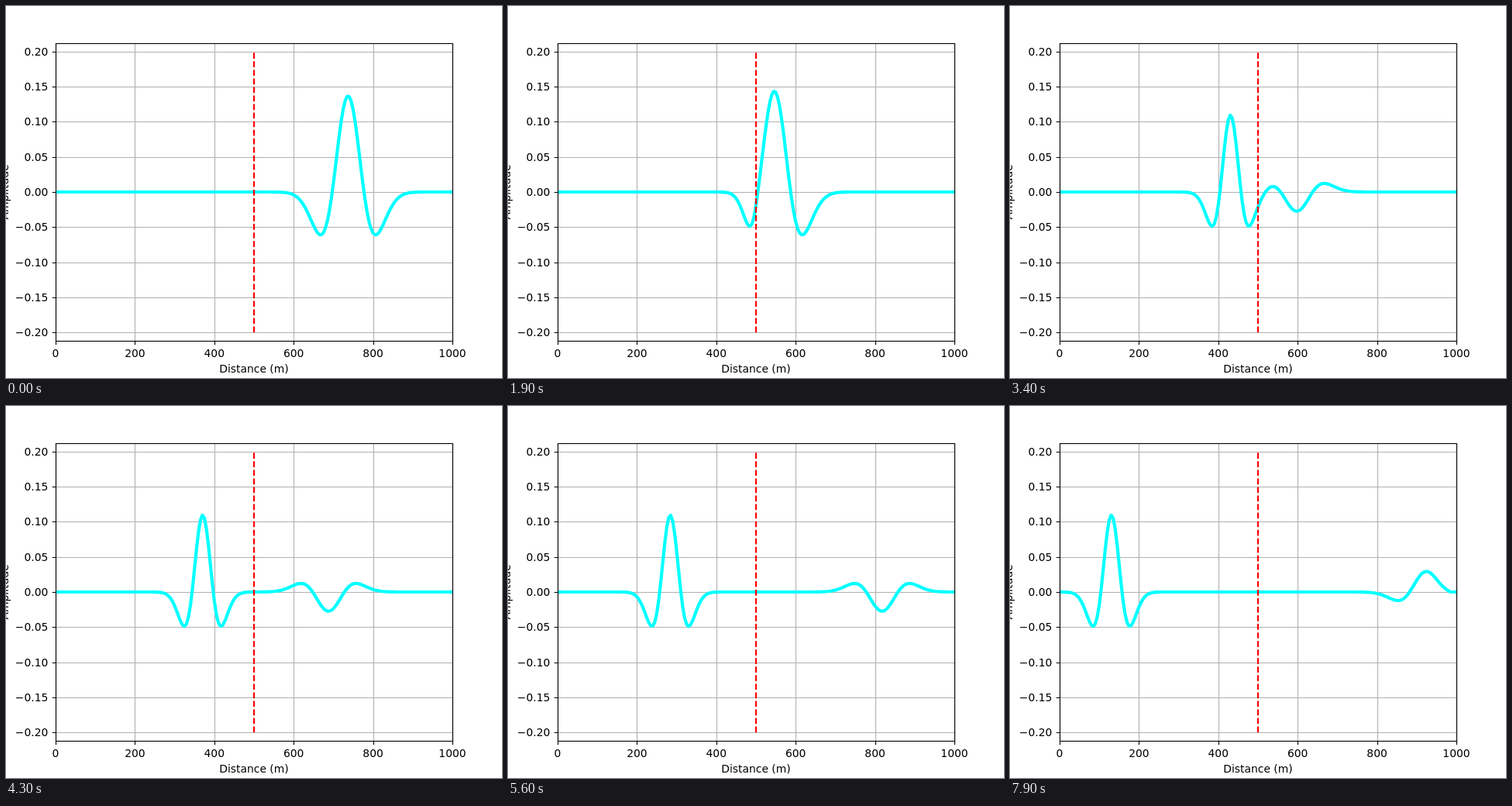
An HTML page for the animation above (8 s loop, 640 by 480 pixels).

```html
<!DOCTYPE html>
<html lang="en">
<head>
<meta charset="utf-8">
<title>Wave at an interface</title>
<style>
  html, body { margin: 0; width: 640px; height: 480px; overflow: hidden; background: #fff; }
  svg { display: block; }
  text { font: 13.89px "DejaVu Sans", sans-serif; fill: #000; }
</style>
</head>
<body>
<svg width="640" height="480" viewBox="0 0 640 480">
  <defs><clipPath id="plot"><rect x="64" y="48" width="512" height="384"/></clipPath></defs>
  <g id="grid" fill="none" stroke-width="1.11"></g>
  <g clip-path="url(#plot)" fill="none">
    <path id="wave" stroke="#0ff" stroke-width="4.17" stroke-linejoin="round" stroke-linecap="square"/>
    <path d="M320 421.3V58.7" stroke="#f00" stroke-width="2.08" stroke-dasharray="7.71 3.33"/>
  </g>
  <rect x="64.5" y="48.5" width="512" height="384" fill="none" stroke="#000" stroke-width="1.11"/>
  <g id="labels"></g>
</svg>
<script>
const FRAME_MS = 100, FRAMES = 80;
const STEP = 5;            // metres between samples
const INTERFACE = 497.5;   // where the wave speed changes
const WALL = 985;          // fixed end on the right
const FAST = 10, SLOW = FAST * 2 / 3; // metres per frame
const ARRIVAL = 23.97;     // frame at which the pulse meets the interface
const AMPLITUDE = 0.1368, WIDTH = 56.6;
const REFLECT = (SLOW - FAST) / (SLOW + FAST), TRANSMIT = 1 + REFLECT;

const toX = d => 64 + d * 0.512;
const toY = a => 240 - a * 906.6;
const snap = v => Math.floor(v + 0.5) + 0.5;
const byId = id => document.getElementById(id);

function add(parent, tag, attrs, content = "") {
  const node = document.createElementNS("http://www.w3.org/2000/svg", tag);
  for (const key in attrs) node.setAttribute(key, attrs[key]);
  node.textContent = content;
  byId(parent).append(node);
}

function label(content, x, y, anchor = "middle", extra = {}) {
  add("labels", "text", { x, y, "text-anchor": anchor, ...extra }, content);
}

function drawAxes() {
  let lines = "", ticks = "";
  for (let d = 0; d <= 1000; d += 200) {
    const x = snap(toX(d));
    lines += `M${x} 48V432`;
    ticks += `M${x} 432.5v4.86`;
    label(d, toX(d), 453);
  }
  for (let i = -4; i <= 4; i++) {
    const y = snap(toY(i * 0.05));
    lines += `M64 ${y}H576`;
    ticks += `M64.5 ${y}h-4.86`;
    label((i * 0.05).toFixed(2).replace("-", "\u2212"), 54.3, Math.round(toY(i * 0.05) + 5), "end");
  }
  add("grid", "path", { d: lines, stroke: "#b0b0b0" });
  add("grid", "path", { d: ticks, stroke: "#000" });
  label("Distance (m)", 320, 473);
  label("Amplitude", 0, 0, "middle", { transform: "translate(3 240) rotate(-90)" });
}

function ricker(offset, width) {
  const a = (offset / width) ** 2;
  return AMPLITUDE * (1 - 2 * a) * Math.exp(-a);
}

function amplitude(d, frame) {
  const since = frame - ARRIVAL;
  if (d < INTERFACE) return TRANSMIT * ricker(d - INTERFACE + SLOW * since, WIDTH * SLOW / FAST);
  if (d >= WALL) return 0;
  const incoming = INTERFACE - FAST * since;
  const outgoing = INTERFACE + FAST * since;
  const echo = 2 * WALL - outgoing;
  return ricker(d - incoming, WIDTH)
    + REFLECT * (ricker(d - outgoing, WIDTH) - ricker(d - echo, WIDTH));
}

function render(time) {
  const frame = Math.floor(time / FRAME_MS) % FRAMES;
  const points = [];
  for (let d = 0; d <= 1000; d += STEP) {
    points.push(`${toX(d).toFixed(2)} ${toY(amplitude(d, frame)).toFixed(2)}`);
  }
  byId("wave").setAttribute("d", "M" + points.join("L"));
}

drawAxes();
const start = performance.now();
function tick() {
  render(performance.now() - start);
  requestAnimationFrame(tick);
}
tick();
</script>
</body>
</html>
```
